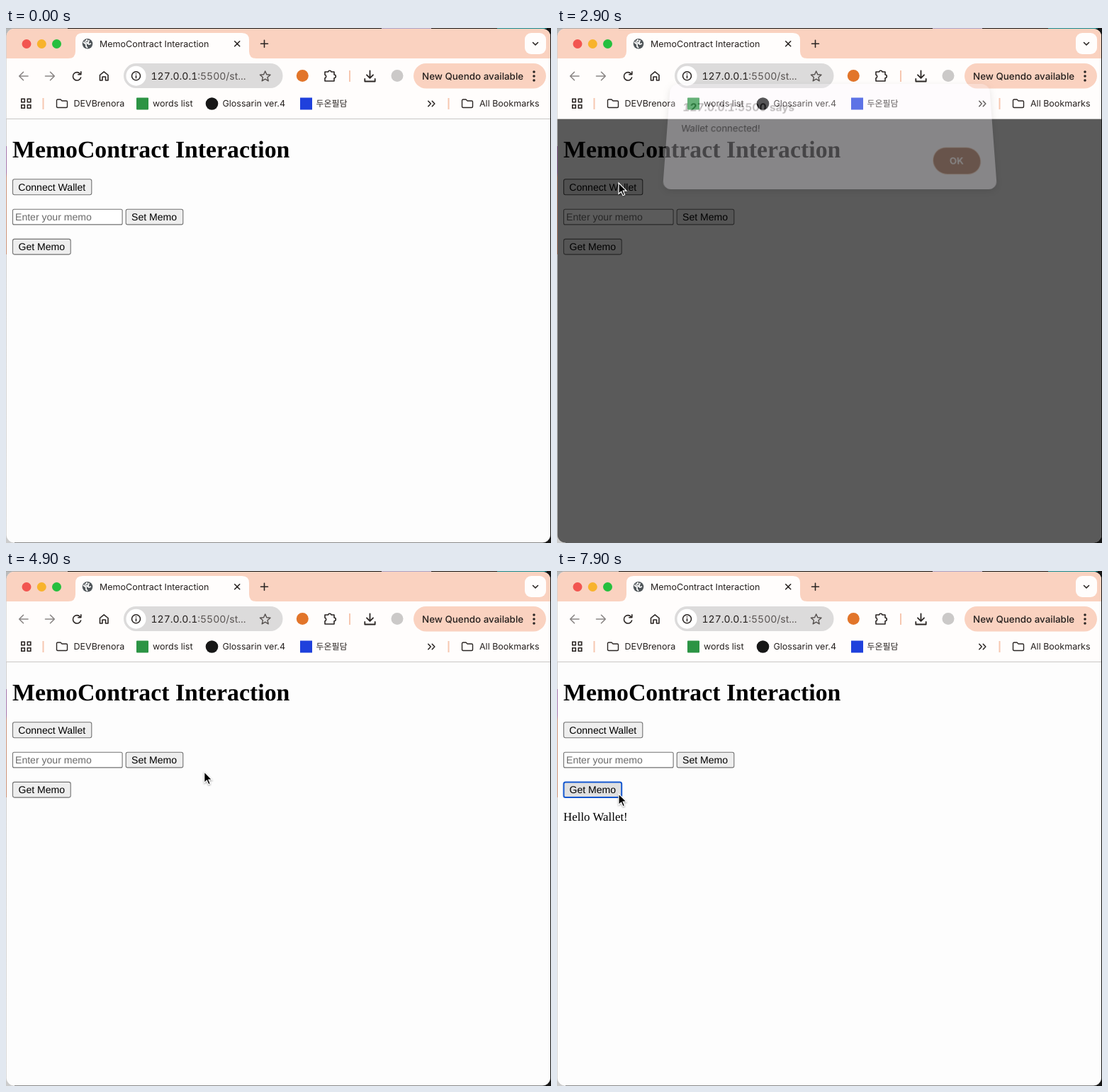
An HTML page for the animation above (8 s loop, 769 by 728 pixels).

```html
<!DOCTYPE html>
<html lang="en">
<head>
<meta charset="utf-8">
<title>MemoContract Interaction</title>
<style>
  html, body { margin: 0; width: 100%; height: 100%; overflow: hidden; background: #161616; }
  svg { position: absolute; left: 0; top: 0; text-rendering: geometricPrecision; }
  .ui { font: 12.5px Inter, "Noto Sans CJK KR", "Noto Sans CJK", sans-serif; fill: #241f1d; }
  .line { fill: none; stroke: #2b2624; stroke-width: 1.6; stroke-linecap: round; stroke-linejoin: round; }
  .page { font: 14.07px "Liberation Sans", Arial, sans-serif; }
  .serif { font-family: "Liberation Serif", Times, serif; }
  .tab { font-variant-numeric: tabular-nums; }
  #dialog {
    position: absolute; left: 148.5px; top: 84px; width: 472px; height: 157px;
    border-radius: 12px; background: #faf6ff; color: #080507;
    box-shadow: 0 3px 10px rgba(0, 0, 0, .35); transform-origin: 50% 100%;
    font: 13.5px/20px Inter, sans-serif;
  }
  #dialog * { position: absolute; white-space: nowrap; }
  #dialog b { left: 20.5px; top: 26px; font-size: 16.3px; font-weight: 600; }
  #dialog span { left: 20.5px; top: 58px; }
  #dialog i {
    left: 383.5px; top: 97px; width: 67px; height: 38px; border-radius: 19px;
    background: #8a4123; color: #fff; box-shadow: 0 0 0 .7px #e3ad83;
    font-style: normal; font-weight: 600; line-height: 38px; text-align: center;
  }
</style>
</head>
<body>
<svg width="769" height="728">
  <defs>
    <linearGradient id="edge" x2="0" y2="1">
      <stop offset="0" stop-color="#bbb"/><stop offset=".23" stop-color="#bbb"/>
      <stop offset=".23" stop-color="#7d3a86"/><stop offset=".28" stop-color="#7d3a86"/>
      <stop offset=".29" stop-color="#b5653f"/><stop offset=".44" stop-color="#b5653f"/>
      <stop offset=".44" stop-color="#bbb"/><stop offset="1" stop-color="#ccc"/>
    </linearGradient>
    <clipPath id="win"><rect x=".7" y="1" width="767.3" height="726.5" rx="11"/></clipPath>
    <path id="folder" class="line" style="stroke-width:1.4" d="M1 2.5Q1 1 2.5 1H6.5L8.5 3H14.5Q16 3 16 4.5V11Q16 12.5 14.5 12.5H2.5Q1 12.5 1 11Z"/>
  </defs>
  <rect width="12" height="728" fill="url(#edge)"/>
  <path d="M0 .5H87" stroke="#aaa"/>
  <path d="M530 .5H600" stroke="#aaa3c8"/>
  <path d="M693 .5H763" stroke="#168b91"/>

  <g clip-path="url(#win)">
    <rect width="769" height="728" fill="#fdfdfd"/>
    <rect width="769" height="43" fill="#fad2c0"/>
    <rect y="43" width="769" height="85" fill="#fffdfc"/>
    <path d="M0 128.5H769" stroke="#c9c7c6"/>
    <path d="M88 43Q98 43 98 33V17Q98 7 108 7H333Q343 7 343 17V33Q343 43 353 43Z" fill="#fffdfc"/>

    <circle cx="29" cy="22.5" r="6.5" fill="#f25550"/>
    <circle cx="50.3" cy="22.5" r="6.5" fill="#f8b32c"/>
    <circle cx="71.5" cy="22.5" r="6.5" fill="#25bf3e"/>
    <circle cx="115" cy="22.3" r="7.3" fill="#50565a"/>
    <path d="M109 20L113 23V26L115 28M114 16V18L111 19M117 17L116 21H114L117 23L120 22" fill="none" stroke="#fff" stroke-width="1.8"/>
    <path class="line" d="M322.7 18.8L329.7 25.8M329.7 18.8L322.7 25.8M364.5 17.3V27.3M359.5 22.3H369.5"/>
    <rect x="732" y="7" width="30" height="30" rx="9" fill="#fffdfc"/>
    <path class="line" d="M743.5 20.5L747 24L750.5 20.5"/>

    <path class="line" opacity=".55" d="M31 68H19M24.5 62.3L18.7 68L24.5 73.7M55.5 68H68M62.5 62.3L68.3 68L62.5 73.7"/>
    <path class="line" d="M105 65.3A5.7 5.7 0 1 0 105.6 70M105.8 61.8V65.8H101.8"/>
    <path class="line" d="M132.5 66.5L138.2 61.8L144 66.5V74H140.5V69H136V74H132.5Z"/>
    <rect x="166" y="50" width="224.5" height="35" rx="17.5" fill="#dcdbdb"/>
    <circle cx="183.5" cy="67.7" r="14" fill="#fff"/>
    <circle class="line" cx="183.5" cy="67.7" r="6"/>
    <path class="line" d="M183.5 67.5V70.7M183.5 64.8V64.9"/>
    <path class="line" style="stroke:#55504e;stroke-width:1.4" d="M365.7 61L367.8 65.8L373 66.3L369 69.8L370.2 74.8L365.7 72.1L361.2 74.8L362.4 69.8L358.4 66.3L363.6 65.8Z"/>
    <circle cx="418.3" cy="67.5" r="8.5" fill="#e2752a"/>
    <path class="line" d="M450 62H454.5A2.3 2.3 0 0 1 459 62H463V66A2.3 2.3 0 0 1 463 70.7V75H450V70.8A2.4 2.4 0 0 0 450 66.2Z"/>
    <path d="M485 60V76M52.5 99V115M624.5 99V115" stroke="#f6c7b0" stroke-width="2"/>
    <path class="line" style="stroke-width:1.8" d="M513.5 60.5V70M509 66.3L513.5 70.8L518 66.3M506.3 72V75.5H520.7V72"/>
    <circle cx="552" cy="67.5" r="8.5" fill="#cbc9c8"/>
    <rect x="575" y="50" width="187" height="35.5" rx="17.7" fill="#fad2c0"/>
    <g fill="#2b2624">
      <circle cx="745" cy="62" r="1.8"/><circle cx="745" cy="68" r="1.8"/><circle cx="745" cy="74" r="1.8"/>
    </g>

    <path class="line" style="stroke-linejoin:miter" d="M21.8 100.3H26.3V104.8H21.8ZM30.3 100.3H34.8V104.8H30.3ZM21.8 108.8H26.3V113.3H21.8ZM30.3 108.8H34.8V113.3H30.3Z"/>
    <use href="#folder" x="70.5" y="100"/>
    <use href="#folder" x="642.5" y="100"/>
    <rect x="184" y="98.5" width="17" height="17" rx="1" fill="#2c9444"/>
    <circle cx="290.5" cy="107" r="8.8" fill="#171717"/>
    <rect x="415" y="98.5" width="17" height="17" fill="#1f40dc"/>
    <path class="line" d="M595.8 103.3L599.3 107L595.8 110.7M601.3 103.3L604.8 107L601.3 110.7"/>

    <g class="ui">
      <text x="132" y="26.7">MemoContract Interaction</text>
      <text class="tab" x="204.5" y="73" style="font-size:14px">127.0.0.1<tspan fill="#5b5654">:5500/st...</tspan></text>
      <text x="587" y="72.7" style="font-size:13.4px;font-weight:500">New Quendo available</text>
      <text x="95.5" y="111.3">DEVBrenora</text>
      <text x="207" y="111.3">words list</text>
      <text x="305.5" y="111.3">Glossarin ver.4</text>
      <text x="437.5" y="111.3" style="font-size:12px">두온필담</text>
      <text x="668" y="111.3">All Bookmarks</text>
    </g>

    <g class="page">
      <text class="serif" x="9" y="182.5" style="font-size:33.8px;font-weight:bold">MemoContract Interaction</text>
      <g>
        <rect id="connect" x="9.5" y="213.8" width="111.3" height="22" rx="2.5"/>
        <rect id="memo" x="9.5" y="256.2" width="154.6" height="21.7" rx="2"/>
        <rect id="set" x="169.2" y="256.2" width="80.6" height="21.7" rx="2.5"/>
        <rect id="get" x="9.5" y="298.4" width="81.7" height="21.7" rx="2.5"/>
      </g>
      <text x="17.3" y="229.5">Connect Wallet</text>
      <text x="13" y="272" fill="#6a6a6a">Enter your memo</text>
      <text x="177" y="272">Set Memo</text>
      <text x="17.5" y="314.3">Get Memo</text>
      <text id="reply" class="serif" x="9" y="353" style="font-size:16.9px">Hello Wallet!</text>
    </g>
    <rect id="scrim" y="129" width="769" height="599" opacity=".645"/>
  </g>
</svg>

<div id="dialog"><b class="tab">127.0.0.1:5500 says</b><span>Wallet connected!</span><i>OK</i></div>

<svg width="769" height="728">
  <path id="cursor" d="M0 0V15.5L3.6 12.2L6 17.8L8.6 16.7L6.2 11.2H11Z" stroke="#fff" stroke-width="1.2"
    style="filter:drop-shadow(0 1px 1px rgba(0,0,0,.35))"/>
</svg>

<script>
const $ = id => document.getElementById(id);

// Pointer stops: time, x, y
const stops = [
  [200, 60, 750], [1000, 38, 318], [1200, 35, 303], [1700, 35, 303],
  [2500, 87, 219], [3200, 87, 219], [3900, 560, 206], [4400, 560, 206],
  [5200, 150, 320], [5800, 130, 267], [6400, 87, 315], [8000, 87, 315]
];

function pointer(t) {
  const i = stops.findIndex(s => s[0] > t);
  if (i < 1) return stops[0].slice(1);
  const [a, b] = [stops[i - 1], stops[i]];
  const k = (t - a[0]) / (b[0] - a[0]), e = k * k * (3 - 2 * k);
  return [a[1] + (b[1] - a[1]) * e, a[2] + (b[2] - a[2]) * e];
}

// 0 is fully open, 1 is strongly tilted and faint
function tilt(t) {
  if (t < 3100) return [1, .35][(t - 2900) / 100];
  return t < 4200 ? 0 : [.43, 1][(t - 4200) / 100];
}

function paint(id, fill, stroke, width = 1.1) {
  const s = $(id).style;
  s.fill = fill;
  s.stroke = stroke;
  s.strokeWidth = width;
}

function draw(now) {
  const t = Math.floor(now % 8000 / 100) * 100;
  const [x, y] = pointer(t);
  const modal = t >= 2900 && t < 4200;
  $("cursor").setAttribute("transform", `translate(${x} ${y})`);

  const over = id => {
    const { left, right, top, bottom } = $(id).getBoundingClientRect();
    return !modal && x >= left && x <= right && y >= top && y <= bottom;
  };
  for (const id of ["connect", "set", "get"]) {
    const hot = over(id) || id === "connect" && t >= 2900 && t < 4400;
    const down = id === "connect" && t === 2800 || id === "get" && t === 6700;
    const focus = id === "get" && t >= 6700;
    paint(id, down ? "#f5f5f5" : hot ? "#e0e0e0" : "#eee",
      focus ? "#1558d0" : hot ? "#4f4f4f" : "#717171", focus ? 2 : 1.1);
  }
  const hot = over("memo");
  paint("memo", "#fff", hot ? "#484848" : "#717171", hot ? 1.4 : 1.1);

  $("scrim").style.display = modal ? "" : "none";
  $("reply").style.display = t >= 7000 ? "" : "none";

  const u = tilt(t), box = $("dialog").style;
  box.display = u === undefined ? "none" : "";
  box.opacity = 1 - .72 * u;
  box.transform = `translateY(${-13 * u}px) perspective(300px) rotateX(${5.4 * u}deg)`;
}

const start = performance.now();
function tick() {
  draw(performance.now() - start);
  requestAnimationFrame(tick);
}
tick();
</script>
</body>
</html>
```
